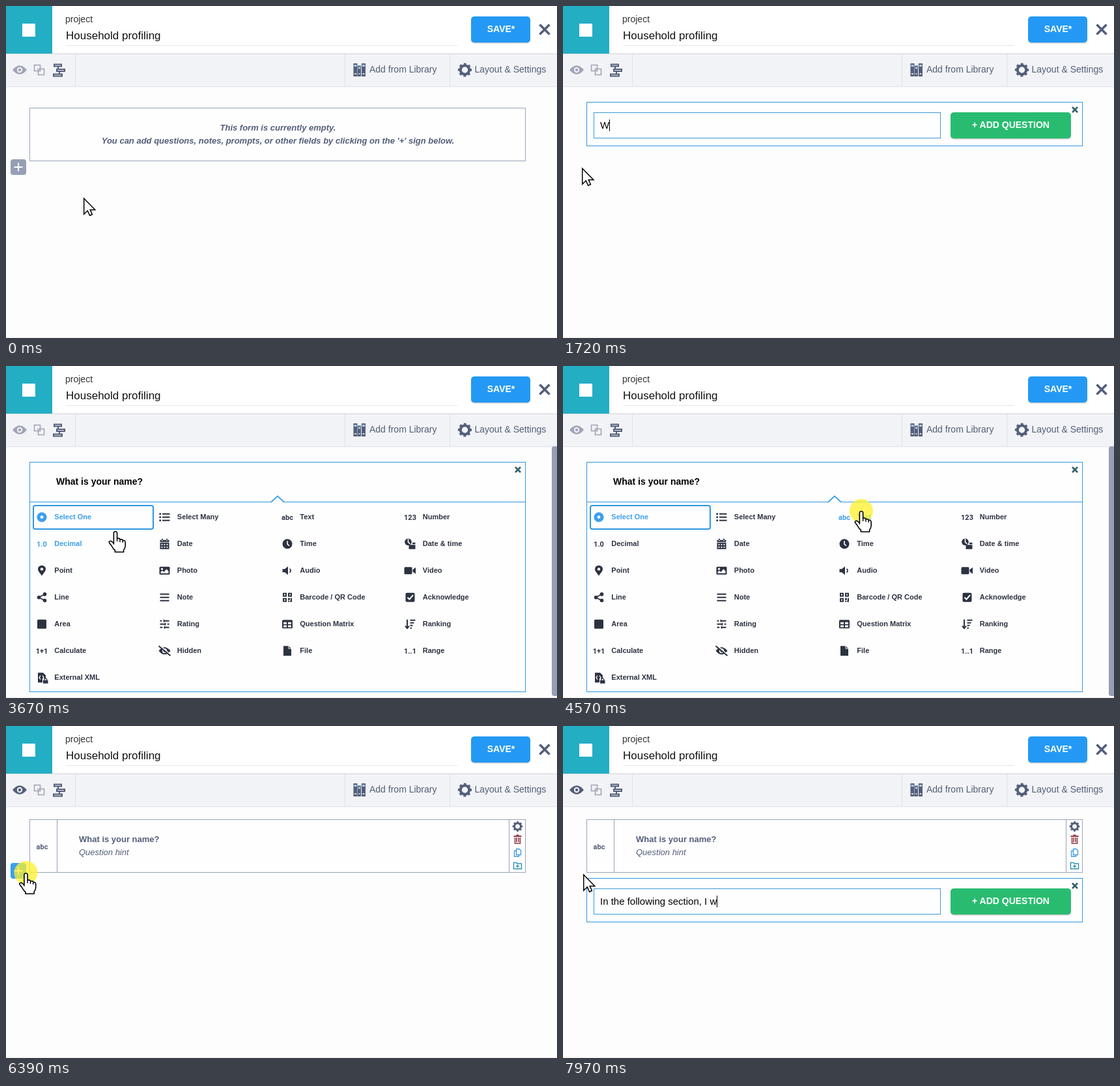
Recreate the animation shown at these times as an HTML page. Size 846 by 509 pixels, loop 7990 ms.

```html
<!DOCTYPE html>
<html lang="en">
<head>
<meta charset="utf-8">
<title>Form builder</title>
<style>
  html, body { margin: 0; width: 100%; height: 100%; overflow: hidden; background: #fdfdfd; }
  svg { display: block; }
  text { font-family: "Liberation Sans", Arial, sans-serif; white-space: pre; }
  .b { font-weight: bold; }
  .i { font-style: italic; }
  .glyph { font: bold 11px Roboto, sans-serif; text-anchor: middle; fill: currentColor; }
  .item { color: #2c3240; }
  .item.on { color: #3d9fee; }
</style>
</head>
<body>
<svg id="stage" width="846" height="509" viewBox="0 0 846 509"></svg>
<script>
const LOOP = 7990;
const SLATE = '#535e79', BLUE = '#2e97e2';

// --- markup helpers ---
const rect = (x, y, w, h, fill, more = '') =>
  `<rect x="${x}" y="${y}" width="${w}" height="${h}" fill="${fill}" ${more}/>`;
const frame = (x, y, w, h, color) =>
  rect(x + .5, y + .5, w - 1, h - 1, '#fefefe', `stroke="${color}"`);
const text = (x, y, size, fill, str, cls = '', more = '') =>
  `<text x="${x}" y="${y}" font-size="${size}" fill="${fill}" class="${cls}" ${more}>${str}</text>`;
const line = (d, w = 2, color = 'currentColor', more = '') =>
  `<path d="${d}" fill="none" stroke="${color}" stroke-width="${w}" ${more}/>`;
const fill = (d, color = 'currentColor') =>
  `<path d="${d}" fill="${color}" fill-rule="evenodd"/>`;
const dot = (x, y, r, color = 'currentColor') =>
  `<circle cx="${x}" cy="${y}" r="${r}" fill="${color}"/>`;
const box = (x, y, w, h) => `M${x} ${y}h${w}v${h}h${-w}z`;
const at = (x, y, body, more = '') => `<g transform="translate(${x} ${y})" ${more}>${body}</g>`;
const group = (id, body) => `<g id="${id}">${body}</g>`;
const glyph = str => `<text y="4.5" class="glyph">${str}</text>`;
const bars = (x1, x2) => [-5, 0, 5].map(y => `M${x1} ${y}H${x2}`).join('');

const cross = (r, w, color) => line(`M${-r} ${-r}L${r} ${r}M${r} ${-r}L${-r} ${r}`, w, color);

function gear(r, color) {
  const tooth = 2 * Math.PI * r * .86 / 16;
  return `<circle r="${r * .64}" fill="none" stroke="${color}" stroke-width="${r * .38}"/>` +
    `<circle r="${r * .86}" fill="none" stroke="${color}" stroke-width="${r * .3}"
      stroke-dasharray="${tooth}" transform="rotate(-11.25)"/>`;
}

const clockFace = dot(0, 0, 7.5) + line('M0 -4.5V.5L3 3', 1.6, '#fff');
const page = 'M-6 -7.5H2L6 -3.5V7.5H-6z';
const eyeShape = 'M-11 0Q0 -13.5 11 0Q0 13.5 -11 0z';
const copyShape = 'M-2 -5.5H2.5L5 -3V3.5H-2zM-2 -2.5H-5V6H2V3.5';

// --- menu: label and icon, four to a row ---
const menu = [
  ['Select One', dot(0, 0, 7.5) + dot(0, 0, 2.4, '#fff')],
  ['Select Many', line('M-3.5 -5H8M-3.5 0H8M-3.5 5H8', 2) + [-5, 0, 5].map(y => dot(-6.8, y, 1.5)).join('')],
  ['Text', glyph('abc')],
  ['Number', glyph('123')],
  ['Decimal', glyph('1.0')],
  ['Date', fill(box(-7, -6, 14, 3) + box(-4.5, -8, 2, 3) + box(2.5, -8, 2, 3) + box(-7, -2, 14, 10) +
    [-5, -1, 3].map(x => box(x, 0, 2, 2) + box(x, 4, 2, 2)).join(''))],
  ['Time', clockFace],
  ['Date &amp; time', at(-3, -3, clockFace.replace('7.5', '5.3')) + fill(box(-2, 1.5, 10, 6.5) + box(3.5, -2, 4.5, 2.5))],
  ['Point', fill('M0 8C-3 3 -6 1 -6 -2.5A6 5.5 0 0 1 6 -2.5C6 1 3 3 0 8z') + dot(0, -2.3, 2.2, '#fff')],
  ['Photo', rect(-8, -6, 16, 12, 'currentColor', 'rx="1.5"') + dot(-4, -2.5, 1.6, '#fff') +
    fill('M-6 4V2L-3.5 0L-1 2L3 -2.5L6 1V4z', '#fff')],
  ['Audio', fill('M-7.5 -2.5H-4L1 -6.5V6.5L-4 2.5H-7.5z') + line('M3.5 -2.8Q6.5 0 3.5 2.8', 1.8)],
  ['Video', rect(-9, -5.5, 12, 11, 'currentColor', 'rx="1.5"') + fill('M4 -1.5L8.5 -5V5L4 1.5z')],
  ['Line', line('M5 -5L-5 0L5 5', 1.8) + dot(4.5, -4.8, 2.8) + dot(-4.5, 0, 2.8) + dot(4.5, 4.8, 2.8)],
  ['Note', line(bars(-7, 7), 2)],
  ['Barcode / QR Code', line(box(-6, -6, 4, 4) + box(2, -6, 4, 4) + box(-6, 2, 4, 4), 2) +
    fill(box(1, 1, 3, 3) + box(5, 1, 2, 4) + box(1, 5, 2, 2) + box(4, 5, 3, 2))],
  ['Acknowledge', rect(-7, -7, 14, 14, 'currentColor', 'rx="2"') + line('M-4 0L-1 3L4.5 -3.5', 2, '#fff')],
  ['Area', rect(-7, -7, 14, 14, 'currentColor', 'rx="1.5"')],
  ['Rating', line(bars(-7, 7), 2) + line('M-3 -7V-3M3 -2V2M-2 3V7', 2.4, '#fdfdfd') + line('M-1 -7V-3M1 -2V2M0 3V7', 1.5)],
  ['Question Matrix', rect(-8, -6.5, 16, 13, 'currentColor', 'rx="1.5"') +
    fill(box(-6, -3, 5, 3) + box(1, -3, 5, 3) + box(-6, 1.8, 5, 3) + box(1, 1.8, 5, 3), '#fff')],
  ['Ranking', line('M-4.5 -7V6M-7.5 3L-4.5 6.5L-1.5 3', 2) + line('M0 -6H8M0 -2H6M0 2H4M0 6H2.5', 2)],
  ['Calculate', glyph('1+1')],
  ['Hidden', fill('M-9 0Q0 -11 9 0Q0 11 -9 0z') + dot(0, 0, 3.6, '#fff') + dot(0, 0, 2) +
    line('M-8 -8.5L10 6.5', 1.6, '#fff') + line('M-9 -7.5L9 7.5', 2)],
  ['File', fill(page) + line('M2 -7.5V-3.5H6', 1, '#fff')],
  ['Range', glyph('1..1')],
  ['External XML', fill(page) + line('M-2 -3L-4 0L-2 3M1 -3L3 0L1 3', 1.3, '#fff') +
    rect(1, 1.5, 9, 8, '#fdfdfd') + rect(2, 4, 7.5, 5, 'currentColor') + line('M3.8 4V2.5Q5.7 .5 7.7 2.5V4', 1.3)],
];

const menuItems = menu.map(([label, icon], n) => {
  const x = 55 + (n % 4) * 188.5, y = 231 + (n >> 2) * 41;
  return `<g class="item ${n ? '' : 'on'}">` + at(x, y + .7, icon) +
    text(x + 19.3, y + 4, 11, 'currentColor', label, 'b') + '</g>';
}).join('');

// --- scenes ---
const plusButton = (id, y) => at(7, y,
  `<rect id="${id}" width="24" height="24" rx="4"/>` + line('M12 5.5V18.5M5.5 12H18.5', 1.8, '#fff'), `id="${id}Box"`);

const addBar = id => group(id,
  frame(36, 147, 762, 68, BLUE) + frame(47, 163, 533, 40, '#3c99d8') +
  rect(595, 164.5, 185, 40, '#000', 'rx="5" opacity=".2"') +
  rect(595, 163, 185, 40, '#29bc70', 'rx="5"') +
  text(628, 187, 14, '#fff', '+ ADD QUESTION', 'b') +
  at(786, 159, cross(4, 2.6, '#35606c')) +
  `<text id="typed" x="57" y="188" font-size="15"></text>` +
  `<rect id="caret" y="174" width="1" height="18"/>`);

const tree = line('M74 89.5H85V92.5H74zM78 97H90V100H78zM73 104.5H86V107.5H73zM80 93V97M82 100V104', 2, SLATE);
const books = [[533.5, 88, 6], [540, 91.5, 5], [546, 88, 6]].map(([x, y, w]) =>
  rect(x, y, w, 108 - y, SLATE) + rect(x + 1, y + 2, w - 2, 3, '#a9cbe4') + rect(x + 1.5, 103, w - 3, 2, '#cfd5e2')).join('');

const header =
  rect(0, 73, 846, 51, '#f2f3f6') + rect(0, 0, 846, 73, '#fff') +
  rect(0, 72.5, 846, 1.5, '#dcdee2') + rect(0, 123, 846, 1, '#e4e5e9') + rect(0, 124, 846, 1, '#f5f6f8') +
  rect(0, 0, 71, 73, '#23aec3') + rect(25, 27, 20, 20, '#fff') +
  text(91, 25, 14, '#333', 'project') + text(92, 51, 17, '#111', 'Household profiling') +
  rect(92, 60, 601, 1, '#e6e7ea') +
  rect(714, 17.5, 91, 40, '#000', 'rx="5" opacity=".18"') + rect(714, 16, 91, 40, '#2399f5', 'rx="5"') +
  text(760, 40, 14, '#fff', 'SAVE*', 'b', 'text-anchor="middle"') +
  at(827, 36, cross(7.5, 3.6, SLATE)) +
  [106, 520, 681].map(x => rect(x, 74, 1, 49, '#e0e2e7')).join('') +
  at(21, 98, fill(eyeShape) + dot(0, 0, 4.2, '#f2f3f6') + dot(0, 0, 2.2), 'id="eye"') +
  line(box(43.5, 90.5, 9, 9) + box(49.5, 96.5, 9, 9), 1.6, '#a0a4b6') + tree + books +
  text(558, 102, 14, SLATE, 'Add from Library') + at(704.5, 98, gear(10.5, SLATE)) +
  text(719.5, 102, 14, SLATE, 'Layout &amp; Settings') + rect(0, 508, 846, 1, '#ececee');

const emptyForm = group('empty', frame(36, 156, 762, 82, '#99a3b9') +
  text(417.5, 191, 13, SLATE, 'This form is currently empty.', 'b i', 'text-anchor="middle"') +
  text(417.5, 211, 13, SLATE, "You can add questions, notes, prompts, or other fields by clicking on the '+' sign below.",
    'b i', 'text-anchor="middle"'));

const typeMenu = group('menu', frame(36, 147, 762, 353, BLUE) +
  line('M36 208.5H408M426 208.5H798', 1, BLUE) + line('M407 208.7L417 199.5L427 208.7', 2, '#44a3ea') +
  text(77, 182, 14, '#000', 'What is your name?', 'b') + at(786, 159, cross(4, 2.6, '#35606c')) +
  rect(42, 214, 184, 36, 'none', `stroke="${BLUE}" stroke-width="2" rx="3"`) + menuItems +
  rect(838, 123, 10, 383, '#959eb5', 'rx="4"'));

const questionRow = group('row', frame(36, 143, 762, 82, '#99a3b9') +
  rect(78, 143, 1, 82, '#99a3b9') + rect(772, 143, 1, 82, '#99a3b9') +
  at(55.5, 184, glyph('abc'), 'color="#535e79"') +
  text(112, 178, 13, SLATE, 'What is your name?', 'b') + text(112, 198, 13, SLATE, 'Question hint', 'i') +
  at(785.5, 154, gear(7.8, SLATE)) +
  at(785.5, 174, line('M-6 -5H6M-2 -6.5H2', 2, '#913c46') + line('M-4 -3V6H4V-3M-1.5 -3V4M1.5 -3V4', 1.6, '#913c46')) +
  at(785.5, 194, line(copyShape, 1.3, '#3b9ae0')) +
  at(785.5, 214, line('M-6 -4.5H-2L-.5 -3H6V5H-6zM0 -1.5V3.5M-2.5 1H2.5', 1.4, '#2f93b5')));

const pointer = group('cursor',
  group('glow', dot(0, 0, 18, 'rgba(255,242,40,.74)')) +
  group('arrow', `<path d="M.7 1V25.2L6.2 19.8L9.6 27.2L13.4 25.5L10.2 18.4H17.8z"
    fill="#fff" stroke="#000" stroke-width="1.5"/>`) +
  group('hand', `<path d="M-2.6 20V3Q-2.4 .8 0 .8T2.6 3V11.5Q6.6 10.3 7 13Q10.8 12 11.2 14.4Q15 14 15.2 17V23
    Q14.8 27 12.6 29V32.2H-.6V29.5Q-4 27 -6 22.5L-9.4 18.2Q-10.4 15.6 -7.6 15.2Q-5.4 15.4 -2.6 19z"
    fill="#fff" stroke="#000" stroke-width="1.6" stroke-linejoin="round"/>` +
    line('M2.6 11V16M7 13V17M11.2 14.4V18', 1.4, '#000')));

document.getElementById('stage').innerHTML = rect(0, 0, 846, 509, '#fdfdfd') + header + emptyForm +
  typeMenu + questionRow + addBar('bar') + plusButton('plusA', 235) + plusButton('plusB', 210) + pointer;

// --- timeline ---
// time, x, y of the pointer; a fourth value 1 shows the hand
const moves = [
  [0, 119, 294], [100, 112, 289], [200, 86, 274], [300, 54, 258], [400, 35, 250], [520, 29, 247, 1], [820, 29, 248],
  [3470, 44, 253, 1], [3570, 88, 255, 1], [3670, 168, 253, 1], [3770, 262, 246, 1], [3870, 346, 238, 1],
  [3970, 410, 230, 1], [4070, 445, 224, 1], [4170, 458, 222, 1], [4770, 458, 222],
  [4970, 440, 230], [5070, 372, 249], [5170, 268, 262], [5270, 164, 261], [5390, 80, 246], [5490, 38, 231],
  [5590, 32, 228], [5690, 28.5, 226], [5790, 30.5, 225, 1], [6490, 31, 227],
];
const clicks = [[720, 820], [4570, 4770], [6390, 6490]];
const typing = [
  { str: 'What is your name?', keys: [[1720, 1], [1780, 2], [2280, 18]] },
  { str: 'In the following section, I w', keys: [[6930, 1], [7120, 7], [7160, 8], [7690, 23], [7730, 24], [7970, 29]] },
];

function typedCount(keys, t) {
  if (t < keys[0][0]) return 0;
  for (let k = 1; k < keys.length; k++) {
    const [t0, n0] = keys[k - 1], [t1, n1] = keys[k];
    if (t < t1) return Math.floor(n0 + (n1 - n0) * (t - t0) / (t1 - t0) + 1e-6);
  }
  return keys[keys.length - 1][1];
}

const $ = id => document.getElementById(id);
const show = (id, on) => { $(id).style.display = on ? '' : 'none'; };
const items = [...document.querySelectorAll('.item')];
const pen = document.createElement('canvas').getContext('2d');
pen.font = '15px "Liberation Sans", Arial, sans-serif';

function draw(t) {
  const within = (a, b) => t >= a && t < b;
  const second = t >= 6490;

  show('empty', t < 820);
  show('bar', within(820, 2460) || second);
  show('menu', within(2460, 4770));
  show('row', t >= 4770);
  show('plusABox', t < 820);
  show('plusBBox', within(4770, 6490));
  $('plusA').setAttribute('fill', t < 520 ? '#969fb5' : '#3a9ff4');
  $('plusB').setAttribute('fill', '#3a9ff4');
  $('eye').setAttribute('color', t < 4970 ? '#a0a4b6' : SLATE);

  const { str, keys } = typing[second ? 1 : 0];
  const typed = str.slice(0, typedCount(keys, t));
  $('bar').setAttribute('transform', `translate(0 ${second ? 86 : 0})`);
  $('typed').textContent = typed;
  $('caret').setAttribute('x', 57 + Math.floor(pen.measureText(typed).width));
  show('caret', !within(1320, 1720));

  const [, x, y, hand] = moves.filter(m => m[0] <= t).pop();
  $('cursor').setAttribute('transform', `translate(${x} ${y})`);
  show('hand', hand);
  show('arrow', !hand);
  show('glow', clicks.some(([a, b]) => within(a, b)));

  const over = hand ? Math.floor((x - 41) / 188.5) + 4 * Math.floor((y - 211) / 41) : 0;
  items.forEach((el, n) => el.classList.toggle('on', n === 0 || n === over));
}

const start = performance.now();
function tick() {
  draw((performance.now() - start) % LOOP);
  requestAnimationFrame(tick);
}
tick();
</script>
</body>
</html>
```
